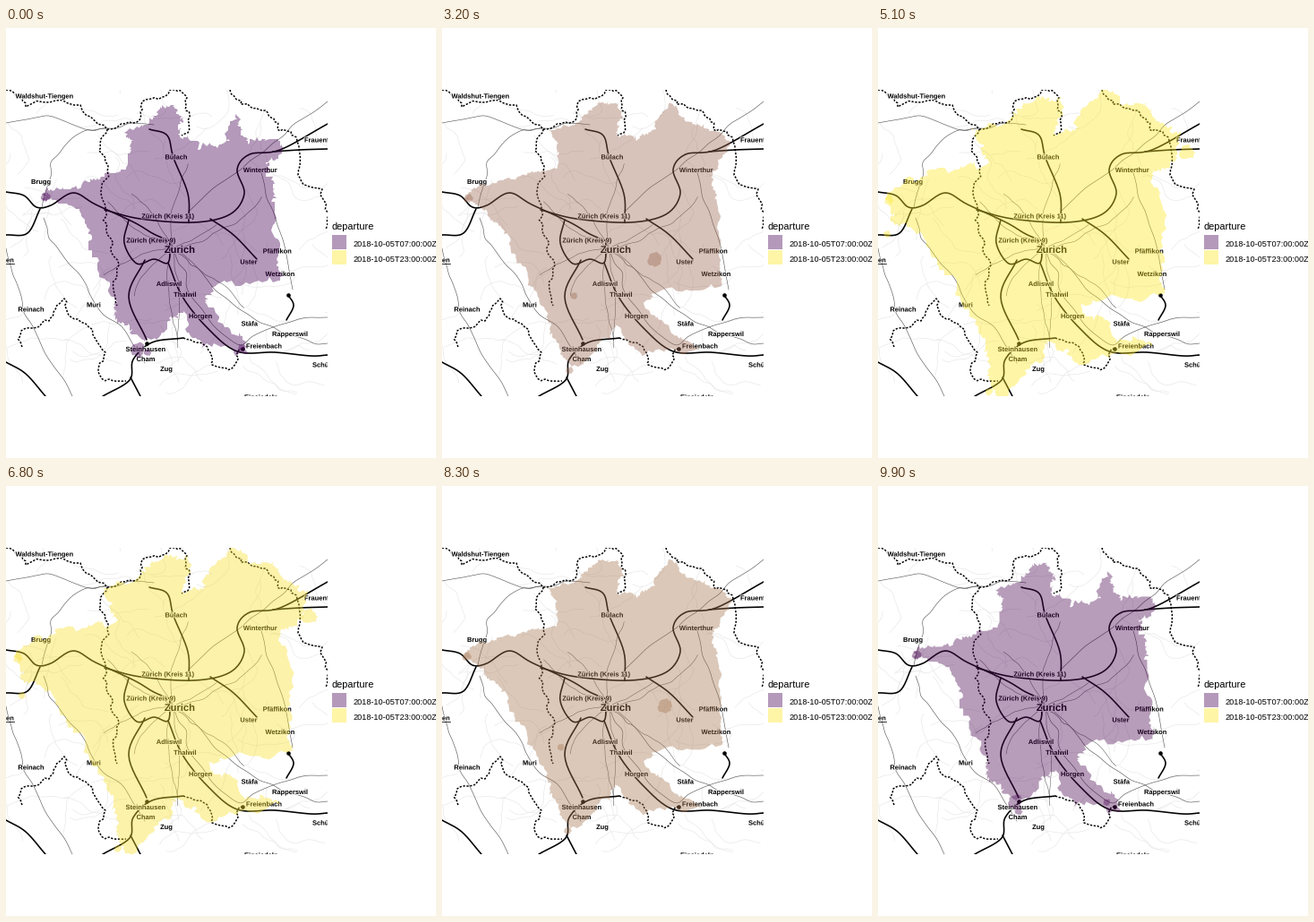
Write a matplotlib script that moves like this. It is 480 by 480 pixels and loops after 10 s.

```python
import numpy as np
import matplotlib.pyplot as plt
from matplotlib.animation import FuncAnimation
from matplotlib.patches import Polygon, Rectangle
from matplotlib.patheffects import withStroke

SIZE, DPI, FRAMES = 480, 100, 100
PX = 72 / DPI
PURPLE, YELLOW, ALPHA = "#440154", "#FDE725", 0.4
rng = np.random.default_rng(8)

fig = plt.figure(figsize=(SIZE / DPI, SIZE / DPI), dpi=DPI, facecolor="white")
ax = fig.add_axes([0, 0, 1, 1])
ax.set(xlim=(0, SIZE), ylim=(SIZE, 0))
ax.axis("off")
panel = Rectangle((0, 69), 359, 342, fc="white", ec="none")
ax.add_patch(panel)


# ---- curves ------------------------------------------------------------
def spline(points, steps=8):
    """Catmull-Rom curve through the points."""
    p = np.array(points, float)
    p = np.vstack([2 * p[0] - p[1], p, 2 * p[-1] - p[-2]])
    t = np.arange(steps)[:, None] / steps
    parts = [b + 0.5 * t * (c - a + t * (2 * a - 5 * b + 4 * c - d + t * (3 * (b - c) + d - a)))
             for a, b, c, d in zip(p, p[1:], p[2:], p[3:])]
    return np.vstack(parts + [p[-2:-1]])


def rough(points, rounds=3, amount=0.1, limit=4):
    """Fractal line: each round shifts every midpoint sideways."""
    p = np.array(points, float)
    for _ in range(rounds):
        d = np.diff(p, axis=0)
        side = np.stack([-d[:, 1], d[:, 0]], 1) * rng.normal(0, amount, (len(d), 1))
        mid = (p[:-1] + p[1:]) / 2 + np.clip(side, -limit, limit)
        p = np.vstack([np.stack([p[:-1], mid], 1).reshape(-1, 2), p[-1:]])
    return p


def path(points, color, width, **style):
    line, = ax.plot(*np.array(points).T, color=color, lw=width * PX, **style)
    line.set_clip_path(panel)


def wander(start, angle, length, bend):
    turn = angle + np.cumsum(rng.normal(0, bend, int(length / 7)))
    steps = 7 * np.stack([np.cos(turn), np.sin(turn)], 1)
    return spline(np.vstack([start, start + np.cumsum(steps, 0)]), 3)


def lane(*points):
    path(spline(rough(points, 2, 0.06), 4), "#555555", 0.6)


def highway(*points):
    path(spline(points), "black", 1.6, solid_capstyle="round")


def border(*points):
    path(rough(points, 3, 0.14), "black", 1.5, linestyle=(0, (1.5, 1.1)))


# ---- map ---------------------------------------------------------------
for _ in range(75):
    path(wander(rng.uniform((0, 69), (359, 411)), rng.uniform(0, 7), 75, 0.35), "#e6e6e6", 0.6)

hub = np.array([186, 246])
for angle in np.arange(0, 2 * np.pi, np.pi / 5):
    path(wander(hub, angle, rng.uniform(60, 130), 0.15), "#555555", 0.5)

lane((0, 106), (48, 98), (110, 112), (165, 108))
lane((40, 200), (50, 150), (85, 116), (112, 112))
lane((42, 212), (62, 252), (95, 300), (155, 374))
lane((0, 246), (12, 285), (36, 346), (74, 411))
lane((188, 250), (214, 268), (258, 312), (310, 341), (359, 352))
lane((188, 250), (207, 300), (262, 354), (318, 328), (359, 323))
lane((204, 205), (262, 158), (310, 120), (359, 82))
lane((284, 158), (303, 220), (320, 292))

highway((0, 183), (20, 187), (34, 200), (50, 198), (75, 184), (100, 197), (143, 217), (165, 230), (184, 238))
highway((0, 231), (24, 229), (38, 202))
highway((110, 203), (150, 213), (210, 217), (250, 208), (266, 185), (258, 158), (272, 141), (306, 136), (359, 107))
highway((298, 138), (328, 136), (359, 135))
highway((160, 113), (180, 120), (187, 145), (203, 185), (204, 217))
highway((137, 214), (132, 240), (146, 263), (165, 258), (181, 262), (183, 238))
highway((155, 259), (137, 300), (157, 348))
highway((108, 411), (138, 393), (142, 370), (163, 351), (198, 346))
highway((139, 390), (150, 411))
highway((0, 373), (22, 386), (44, 411))
highway((181, 262), (197, 300), (225, 335), (258, 361), (300, 362), (340, 366), (359, 365))
highway((228, 213), (254, 231), (280, 258))
highway((315, 298), (321, 310), (313, 326))
for spot in [(315, 298), (264, 358), (157, 352)]:
    ax.plot(*spot, "o", ms=3.2 * PX, color="black")

border((0, 69), (22, 88), (76, 86), (113, 113), (104, 137), (114, 155), (108, 192), (117, 235), (124, 275), (124, 310))
border((113, 113), (146, 105), (152, 82), (183, 69), (202, 78), (205, 96), (196, 120))
border((250, 69), (262, 85), (290, 92), (303, 113), (324, 122), (326, 164), (353, 180), (357, 225))
border((18, 356), (17, 338), (48, 327), (65, 302), (80, 325), (105, 355), (105, 388), (134, 394))
border((198, 346), (226, 360), (230, 376), (254, 378), (264, 358))


# ---- labels ------------------------------------------------------------
def text(x, y, label, size, ha="left", **style):
    return ax.text(x, y, label, fontsize=size * PX, ha=ha, va="center_baseline",
                   family="Liberation Sans", **style)


def town(name, x, y, ha="center", size=7.5):
    label = text(x, y, name, size, ha, weight="bold", zorder=4, clip_on=True,
                 path_effects=[withStroke(linewidth=1.6 * PX, foreground="white")])
    label.set_clip_path(panel)


town("Waldshut-Tiengen", 43, 76)
town("Brugg", 39, 171.5)
town("Bülach", 190, 144)
town("Winterthur", 284, 158.5)
town("Zürich (Kreis 11)", 181, 210)
town("Zürich (Kreis 9)", 162, 237)
town("Zurich", 194, 247, size=11.2)
town("Pfäffikon", 303, 249)
town("Uster", 271, 261)
town("Wetzikon", 306, 274.5)
town("Adliswil", 182, 285.5)
town("Thalwil", 200, 297.5)
town("Horgen", 217, 321.5)
town("Muri", 98, 309)
town("Reinach", 28, 314)
town("Stäfa", 272, 330)
town("Rapperswil", 317, 341.5)
town("Freienbach", 288, 355)
town("Steinhausen", 156, 358.5)
town("Cham", 156, 369.5)
town("Zug", 179, 380.5)
town("Frauenfeld", 333, 125, "left")
town("Schübelbach", 342, 376, "left")
town("Einsiedeln", 266, 412, "left")
town("Schöftlen", 9, 259, "right")
path([(0, 263), (9, 263)], "black", 0.8)

text(364, 221, "departure", 11)
for y, color, hour in [(231, PURPLE, "07"), (248, YELLOW, "23")]:
    ax.add_patch(Rectangle((364, y), 16, 16, fc=color, alpha=ALPHA, lw=0))
    text(387, y + 9.5, f"2018-10-05T{hour}:00:00Z", 9.1)

# ---- reachable area: corners at 07:00 (x, y) and 23:00 (x, y) -----------
corners = np.array([
    (134, 117, 103, 111), (160, 104, 152, 94), (172, 88, 179, 77), (189, 90, 203, 77),
    (197, 104, 206, 95), (195, 120, 197, 117), (214, 137, 222, 114), (248, 127, 226, 97),
    (255, 97, 250, 69), (262, 110, 272, 86), (272, 128, 300, 84), (307, 128, 324, 110),
    (307, 135, 338, 118), (288, 148, 334, 146), (298, 168, 307, 160), (300, 195, 315, 190),
    (303, 262, 322, 255), (304, 283, 318, 296), (230, 290, 240, 305), (224, 308, 226, 309),
    (258, 342, 262, 344), (272, 364, 306, 355), (218, 357, 230, 377), (200, 318, 192, 350),
    (183, 324, 172, 374), (155, 349, 133, 411), (133, 331, 126, 375), (121, 308, 113, 338),
    (103, 262, 84, 276), (92, 228, 44, 232), (84, 206, 14, 214), (40, 193, 8, 192),
    (52, 180, 30, 168), (72, 178, 62, 158), (98, 169, 103, 152), (130, 158, 124, 155),
    (138, 130, 116, 138)])


def outline(points):
    ring = rough(np.vstack([points, points[:1]]), 4, 0.18)
    return np.round((ring + rng.normal(0, 1, ring.shape)) / 2) * 2


def island(x, y, r):
    a = np.linspace(0, 2 * np.pi, 20)
    bumps = r * rng.uniform(0.75, 1.2, a.size)
    return np.stack([x + bumps * np.cos(a), y + bumps * np.sin(a)], 1)


areas = [(outline(corners[:, :2]), outline(corners[:, 2:]))]
for day, night, r in [((263, 357), (10, 230), 4), ((147, 359), (345, 139), 8),
                      ((158, 362), (124, 406), 4), ((44, 188), (12, 192), 5)]:
    areas.append((island(*day, r), island(*night, r)))

shapes = []
for day, _ in areas:
    shape = Polygon(day, closed=True, lw=0, alpha=ALPHA, zorder=5)
    ax.add_patch(shape)
    shape.set_clip_path(panel)
    shapes.append(shape)

# ---- colour blending in CIE Lab ----------------------------------------
TO_XYZ = np.array([[0.4124, 0.3576, 0.1805],
                   [0.2126, 0.7152, 0.0722],
                   [0.0193, 0.1192, 0.9505]])
WHITE = TO_XYZ.sum(1)


def to_lab(color):
    c = np.array([int(color[i:i + 2], 16) for i in (1, 3, 5)]) / 255
    c = np.where(c > 0.04045, ((c + 0.055) / 1.055) ** 2.4, c / 12.92)
    v = TO_XYZ @ c / WHITE
    x, y, z = np.where(v > 0.008856, np.cbrt(v), 7.787 * v + 16 / 116)
    return np.array([116 * y - 16, 500 * (x - y), 200 * (y - z)])


def to_rgb(lab):
    y = (lab[0] + 16) / 116
    v = np.array([y + lab[1] / 500, y, y - lab[2] / 200])
    v = np.where(v > 0.2069, v ** 3, (v - 16 / 116) / 7.787)
    c = np.clip(np.linalg.solve(TO_XYZ, v * WHITE), 0, 1)
    return np.clip(np.where(c > 0.0031308, 1.055 * c ** (1 / 2.4) - 0.055, 12.92 * c), 0, 1)


LAB_DAY, LAB_NIGHT = to_lab(PURPLE), to_lab(YELLOW)


def progress(frame):
    """Hold, morph, hold, morph back."""
    return np.interp(frame, [0, 16, 51, 67, FRAMES], [0, 0, 1, 1, 0])


def update(frame):
    t = progress(frame)
    color = to_rgb(LAB_DAY + (LAB_NIGHT - LAB_DAY) * t)
    for shape, (day, night) in zip(shapes, areas):
        shape.set_xy(day + (night - day) * t)
        shape.set_facecolor(color)
    return shapes


anim = FuncAnimation(fig, update, frames=FRAMES, interval=100, repeat=True,
                     repeat_delay=0, blit=False)
plt.show()
```
